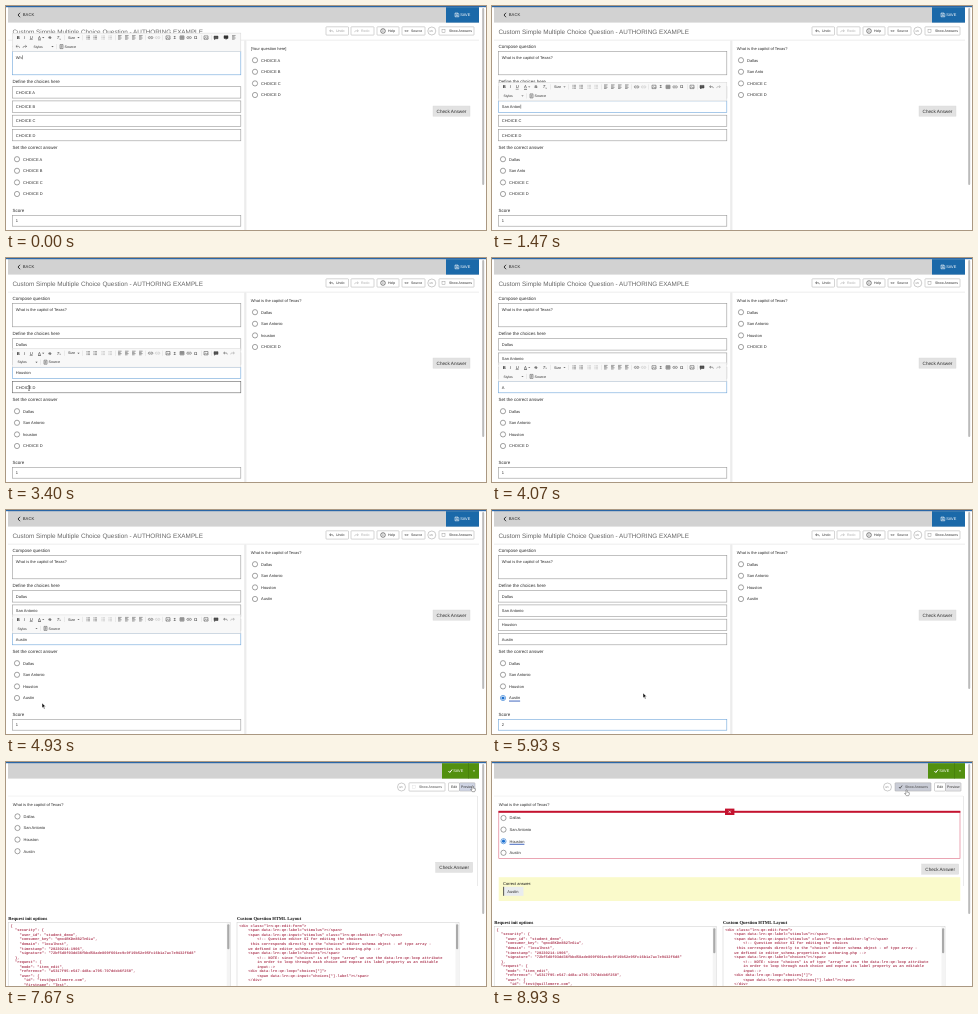
An HTML page that plays this animation: 480 by 224 pixels, repeating every 9.39 s.

```html
<!DOCTYPE html>
<html lang="en">
<head>
<meta charset="utf-8">
<title>Question authoring</title>
<style>
  html, body { margin: 0; width: 100%; height: 100%; overflow: hidden; background: #fff; }
  svg { display: block; width: 480px; height: 224px; }
  text { font-family: "Liberation Sans", Arial, sans-serif; white-space: pre; text-rendering: geometricPrecision; }
  .code { font-family: "Liberation Mono", monospace; font-weight: bold; }
  .serif { font-family: "Liberation Serif", serif; font-weight: bold; }
  .bold { font-weight: bold; }
  .italic { font-style: italic; }
</style>
</head>
<body>
<svg id="stage" viewBox="0 0 480 224"></svg>
<script>
const LOOP = 9390;
const INK = '#2c2c2c', BLUE = '#1a6fd0', RED = '#c4122f';
const stage = document.getElementById('stage');

// Drawing helpers; text is placed by its vertical centre.
const escape = s => s.replace(/&/g, '&amp;').replace(/</g, '&lt;');
const text = (x, y, s, size = 4, fill = INK, cls = '') =>
  `<text x="${x}" y="${y + size * .35}" font-size="${size}" fill="${fill}" class="${cls}">${escape(s)}</text>`;
const rect = (x, y, w, h, fill = '#fff', stroke = 'none', line = .6, r = 0) =>
  `<rect x="${x}" y="${y}" width="${w}" height="${h}" rx="${r}" fill="${fill}" stroke="${stroke}" stroke-width="${line}"/>`;
const path = (x, y, d, stroke = '#444', line = .5, fill = 'none') =>
  `<path transform="translate(${x} ${y})" d="${d}" stroke="${stroke}" stroke-width="${line}" fill="${fill}"/>`;
const circle = (x, y, r, fill, stroke = 'none') =>
  `<circle cx="${x}" cy="${y}" r="${r}" fill="${fill}" stroke="${stroke}" stroke-width=".6"/>`;
const arrowDown = (x, y, fill = '#555') => path(x, y, 'M-1.1 -.5h2.2l-1.1 1.2z', 'none', 0, fill);

const probe = document.createElement('canvas').getContext('2d');
probe.font = '40px "Liberation Sans", Arial, sans-serif';
const widthOf = s => probe.measureText(s).width / 10;

// Value of the latest [time, value] pair.
const at = (t, pairs) => pairs.reduce((v, [start, next]) => t >= start ? next : v, pairs[0][1]);
const typing = (start, gap, from, word) =>
  [...word].slice(from).map((_, i) => [start + i * gap, word.slice(0, from + i + 1)]);

const QUESTION = 'What is the capitol of Texas?';
const ROWS = [80.7, 94.9, 109.2, 123.4];
const FIELDS = [
  [[0, 'CHOICE A'], [870, 'Dallas']],
  [[0, 'CHOICE B'], [870, 'San Ant'], ...typing(1070, 60, 7, 'San Anton'), ...typing(1530, 70, 9, 'San Antonio')],
  [[0, 'CHOICE C'], [2200, ''], ...typing(2400, 90, 0, 'houston'), [3200, 'ouston'], [3270, 'Houston']],
  [[0, 'CHOICE D'], [3930, ''], ...typing(4070, 52, 0, 'Austin')]
];
const LABELS = [
  [[0, 'CHOICE A'], [870, 'Dallas']],
  [[0, 'CHOICE B'], [1270, 'San Anto'], [1670, 'San Antonio']],
  [[0, 'CHOICE C'], [3000, 'houston'], [3530, 'Houston']],
  [[0, 'CHOICE D'], [4470, 'Austin']]
];
const FOCUS = [[0, 'question'], [870, 1], [1870, 2], [3470, 3], [5130, ''], [5400, 'score']];
const SAVED = 7130, PICKED = 8070, CHECKED = 8400, SHOWN = 8730;

// Pointer stops: time, x, y, shape on the way to the next stop.
const POINTER = [
  [3130, 60, 104, 'arrow'], [3330, 23, 130, 'beam'], [3540, 23, 130, ''],
  [4470, 24, 136, 'arrow'], [4930, 36, 193, 'arrow'], [5070, 12, 187, 'hand'], [5200, 12, 187, 'arrow'],
  [5400, 22, 213, 'beam'], [5730, 22, 213, 'arrow'], [5930, 151, 183, 'arrow'], [6530, 366, 84, 'arrow'],
  [6730, 366, 78, 'arrow'], [7000, 456, 10, 'hand'], [7200, 456, 10, 'hand'], [7470, 466, 24, 'hand'],
  [7700, 466, 24, 'arrow'], [8000, 22, 78, 'hand'], [8130, 22, 78, 'arrow'], [8370, 446, 105, 'hand'],
  [8470, 446, 105, 'arrow'], [8670, 414, 28, 'hand'], [LOOP, 414, 28, 'hand']
];
const SHAPES = {
  arrow: ['M0 0v5l1.2-1.1.9 2 .9-.4-.9-1.9h1.6z', '#fff', .5, '#111'],
  hand: ['M0 0q.7-.6 1.1 .1v1.9l2.2.7v1.6l-.7 1.4h-2.2l-1.8-2.2.4-.5 1 .6z', '#555', .5, '#fff'],
  beam: ['M-.8-2.4h1.6M0-2.4v4.8M-.8 2.4h1.6', '#222', .5]
};

function pointer(t) {
  const i = POINTER.findIndex(p => p[0] > t) - 1;
  if (i < 0 || !POINTER[i][3]) return '';
  const [t0, x0, y0, shape] = POINTER[i], [t1, x1, y1] = POINTER[i + 1];
  const k = (t - t0) / (t1 - t0), ease = k * k * (3 - 2 * k);
  return path(x0 + (x1 - x0) * ease, y0 + (y1 - y0) * ease, ...SHAPES[shape]);
}

const radio = (x, y, label, on) =>
  circle(x, y, 2.6, '#fff', on ? BLUE : '#666') + (on ? circle(x, y, 1.6, BLUE) : '') +
  text(x + 6, y, label) + (on ? rect(x + 6, y + 2.6, widthOf(label), .9, '#2f58b8') : '');

function field(y, h, value, state, cy = y + h / 2) {
  const stroke = { focus: '#6fa6da', hover: '#666' }[state] || '#999';
  return rect(6.5, y, 228.3, h, '#fff', stroke) + text(9.8, cy, value);
}

const caret = (value, y) => rect(10 + widthOf(value), y - 2, .4, 4, '#111');

const LINES = 'M0 0h3.6M0 1.2h2.6M0 2.4h3.6M0 3.6h2.6';
const LIST = 'M0 .4h.6M1.4 .4h2.6M0 1.9h.6M1.4 1.9h2.6M0 3.4h.6M1.4 3.4h2.6';
const LINK = 'M1.8 1h-1a1 1 0 0 0 0 2h1M2.4 1h1a1 1 0 0 1 0 2h-1M1.2 2h1.8';
const FRAME = 'M0 .3h4v3.4h-4zM.4 3.2l1.2-1.4 1 .9 .7-.6 .7 .8';
const TABLE = 'M0 .3h4v3.4h-4zM0 1.4h4M0 2.5h4M2 .3v3.4';
const UNDO = 'M1.5 .6l-1.4 1.2 1.4 1.2M.2 1.8h2.6q1 .1 1 1.4';
const REDO = 'M2.5 .6l1.4 1.2-1.4 1.2M3.8 1.8h-2.6q-1 .1-1 1.4';
const SOURCE = 'M0 0h3v4h-3zM.7 1.2h1.6M.7 2.2h1.6M.7 3.1h1';

function toolbar(bottom, wide) {
  const y = bottom - 14, low = bottom - 5, x2 = wide ? 16 : 0;
  const icon = (x, d, row = y, color) => path(x, row - 2, d, color);
  let out = rect(6.5, bottom - 18.5, 228.3, 18.5, '#f8f8f8', '#d6d6d6', .5);
  out += text(10.7, y, 'B', 4.2, INK, 'bold') + text(17.7, y, 'I', 4.2, INK, 'italic') +
    text(23.7, y, 'U', 4.2) + rect(23.7, y + 2, 3, .4, INK) +
    text(32, y, 'A', 4.2) + rect(32, y + 2, 3, .6, INK) + arrowDown(37.2, y) +
    text(42.4, y, 'S', 4.2) + rect(42, y - .1, 3.6, .4, INK) +
    text(50.8, y, 'T', 4.2, INK, 'italic') + text(53.4, y + 1, 'x', 2.6);
  out += text(62, y, 'Size', 3.6) + arrowDown(72.5, y);
  out += [80, 87].map(x => icon(x, LIST)).join('') + [95, 102].map(x => icon(x, LIST, y, '#aaa')).join('');
  out += [112, 119, 126, 133].map(x => icon(x, LINES)).join('');
  out += icon(142.5, LINK) + icon(149.5, LINK, y, '#bbb') + icon(160, FRAME) + text(167.5, y, 'Σ', 4.4) +
    icon(174, TABLE) + icon(181, LINK) + text(188, y, 'Ω', 4.4) + icon(198, FRAME) +
    path(208, y - 1.5, 'M0 0h4v2.6h-2.4l-1 1v-1h-.6z', '#333', .5, '#555');
  if (wide) out += path(218, y - 1.8, 'M0 0h4v2.6h-1l-1 1v-1h-2z', '#333', .5, '#333') + icon(226, LINES);
  const [ux, uy] = wide ? [9.8, low] : [217.5, y];
  out += icon(ux, UNDO, uy) + icon(ux + 7, REDO, uy, wide ? '#444' : '#999');
  out += [58.5, 76.5, 109, 139.5, 156.5, 195, 205].map(x => rect(x, y - 2.6, .4, 5.2, '#d4d4d4')).join('');
  out += text(11.5 + x2, low, 'Styles', 3.4) + arrowDown(30.5 + x2, low) + rect(34.5 + x2, low - 2.6, .4, 5.2, '#d4d4d4') +
    icon(38 + x2, SOURCE, low) + text(42.5 + x2, low, 'Source', 3.6);
  return out;
}

const button = (x, w, label, color = INK, fill = '#fff', pad = 10) =>
  rect(x, 20.8, w, 8.3, fill, '#aaa', .5, .6) + text(x + pad, 25, label, 3.5, color);
const keyButton = x => circle(x, 25, 4, '#fff', '#aaa') + text(x - 2.6, 24.9, '</>', 2.8, '#555');
const checkAnswer = (x, y) => rect(x, y, 37, 10.2, '#e2e2e2', '#d8d8d8', .4) + text(x + 3.6, y + 5.1, 'Check Answer', 4.65);

const frame = thumb =>
  rect(0, 0, 480, 224) + rect(2, 1, 471, 15.6, '#d2d2d2') + rect(0, 0, 480, 1.2, '#2a66a6') +
  rect(476.2, 2, 2, thumb, '#bbb', 'none', 0, 1);

function editPage(t) {
  const focus = at(t, FOCUS), first = t < 870;
  const labels = LABELS.map(pairs => at(t, pairs));
  const values = FIELDS.map(pairs => at(t, pairs));
  let out = frame(177) + path(12, 6.8, 'M2 0l-2 2.2 2 2.2', '#222', .9) + text(16.8, 9, 'BACK', 4.2) +
    rect(440, 1.2, 33, 15.4, '#1b69a9') + path(449, 7, 'M0 0h3l.8.8v3h-3.8zM.9 0v1.3h1.6v-1.3M.9 3.8v-1.3h2v1.3', '#fff', .5) +
    text(454.2, 9, 'SAVE', 3.9, '#fff');

  out += text(6.5, 25.5, 'Custom Simple Multiple Choice Question - AUTHORING EXAMPLE', 6.35, '#666') +
    rect(2, 33.8, 471, .6, '#e2e2e2') + rect(238.2, 34.4, 2.2, 189.6, '#ececec');
  const undoInk = first ? '#999' : INK;
  out += button(320, 22.5, 'Undo', undoInk) + path(323.5, 23, UNDO, undoInk) +
    button(345, 23, 'Redo', '#aaa') + path(348.5, 23, REDO, '#aaa') +
    button(371, 22, 'Help', INK, '#fff', 11) + circle(377, 25, 2.3, '#fff', INK) + text(376.5, 25, 'i', 3.4, INK, 'bold') +
    button(396, 23, 'Source', INK, '#fff', 9) + text(398.5, 25, '<>', 3.4, INK, 'bold') + keyButton(425.8) +
    button(433, 35, 'Show Answers') + rect(436, 23.4, 3, 3, '#fff', '#888', .4);

  out += text(6.5, 40, 'Compose question', 4.5) + text(6.5, 75, 'Define the choices here', 4.5) +
    text(6.5, 141, 'Set the correct answer', 4.5) + text(6.5, 204, 'Score', 4.5);
  const question = first ? 'Wh' : QUESTION;
  out += field(45.6, 23.2, question, first && 'focus', 51.3);
  ROWS.forEach((y, i) => {
    const hover = i === 3 && t >= 3330 && t < 3470;
    const selected = (i === 2 && t >= 2130 && t < 2200) || (i === 3 && t >= 3800 && t < 3930);
    if (selected) out += field(y, 11.4, '', 'focus') + rect(9.7, y + 3.2, 20, 5, '#b4d5fe') + text(9.8, y + 5.7, values[i]);
    else out += field(y, 11.4, values[i], focus === i ? 'focus' : hover && 'hover');
  });
  out += field(209.5, 10.7, t < 5530 ? '1' : '2', focus === 'score' && 'focus');
  labels.forEach((label, i) => {
    out += radio(11, 153.2 + i * 11.6, label, i === 3 && t >= 5130) + radio(249, 54.2 + i * 11.6, label);
  });
  out += text(244.7, 42.2, first ? '[Your question here]' : QUESTION) + checkAnswer(427, 100);

  const blink = (t + 550) % 1000 < 450;
  if (first) out += toolbar(45.6, true) + caret(question, 51.3);
  else if (focus > 0) out += toolbar(ROWS[focus]) + (blink ? caret(values[focus], ROWS[focus] + 5.7) : '');
  return out;
}

const REQUEST = `{
  "security": {
    "user_id": "student_demo",
    "consumer_key": "qmx4RKDe8B2Tn6Lw",
    "domain": "localhost",
    "timestamp": "20230214-1906",
    "signature": "72bf5d8f03dd36fbbd58ade809f601ec9c9f19b52e95fc16b1a7ac7e9432f6d8"
  },
  "request": {
    "mode": "item_edit",
    "reference": "a5317f95-e547-4d8a-a795-707ddcb6f250",
    "user": {
      "id": "test@quillomere.com",
      "firstname": "Test",`.split('\n');
const LAYOUT = `<div class="lrn-qe-edit-form">
    <span data-lrn-qe-label="stimulus"></span>
    <span data-lrn-qe-input="stimulus" class="lrn-qe-ckeditor-lg"></span>
        <!-- Question editor UI for editing the choices
     this corresponds directly to the "choices" editor schema object - of type array -
    we defined in editor_schema.properties in authoring.php -->
    <span data-lrn-qe-label="choices"></span>
        <!-- NOTE: since "choices" is of type "array" we use the data-lrn-qe-loop attribute
        in order to loop through each choice and expose its label property as an editable
        input-->
    <div data-lrn-qe-loop="choices[*]">
        <span data-lrn-qe-input="choices[*].label"></span>
    </div>`.split('\n');

const codeBox = (x, y, title, lines) =>
  text(x, y, title, 4.6, '#111', 'serif') + rect(x, y + 4.5, 222, 80, '#fff', '#ccc', .5) +
  rect(x + 218.5, y + 4.8, 3.3, 80, '#f4f4f4') + rect(x + 219, y + 6, 2.2, 25, '#aaa', 'none', 0, 1) +
  lines.map((line, i) => text(x + 2.3, y + 7.4 + i * 4.53, line, 3.73, '#b0405a', 'code')).join('');

function previewPage(t) {
  const checked = t >= CHECKED, shown = t >= SHOWN;
  let out = frame(150) + rect(436, 1.2, 37, 15.4, '#52900f') + rect(462.3, 1.2, .5, 15.4, '#3f7209') +
    path(442.5, 7.4, 'M0 1.6l1.3 1.5 2.3-3', '#fff', 1) + text(447.2, 9, 'SAVE', 3.9, '#fff') + arrowDown(468, 9, '#fff');
  out += keyButton(395.5) + button(403, 36, 'Show Answers', '#444', shown ? '#c9ccd6' : '#fff') +
    (shown ? path(407, 23.4, 'M0 1.6l1.1 1.3 2-2.8', '#333', .7) : rect(406.5, 23.4, 3, 3, '#fff', '#ddd', .4)) +
    button(442.5, 11, 'Edit', INK, '#fff', 2.4) +
    button(453.5, 15.5, 'Preview', INK, t < 7800 ? '#cfd4e4' : '#e4e4e8', 1.6);
  out += rect(2, 33.8, 469, .5, '#e6e6e6') + rect(471, 34, .6, 90, '#ddd') + text(6.7, 42.3, QUESTION);

  const shift = checked ? 1.6 : 0;
  if (checked) out += rect(6.8, 49.5, 461.2, 47, '#fff', '#dc6a80', .6) + rect(6.5, 48.8, 461.8, 2, RED) +
    rect(233, 46.6, 9.4, 6.4, RED) + path(236.6, 48.7, 'M0 0l2.2 2.2M2.2 0l-2.2 2.2', '#fff', .7);
  ['Dallas', 'San Antonio', 'Houston', 'Austin'].forEach((label, i) => {
    out += radio(11.5, 54.4 + shift + i * 11.6, label, i === 2 && t >= PICKED);
  });
  out += checkAnswer(429.7, checked ? 102 : 100.2);
  if (shown) out += rect(6.7, 115.2, 461.6, 23.8, '#fafacb') + text(11, 121.2, 'Correct answer:', 4, '#111') +
    rect(12, 124.8, 19.5, 9, '#e9ecee') + rect(11.2, 124.8, .9, 9, '#444') + text(15.3, 129.5, 'Austin');

  const y = checked ? 160.2 : 156.2;
  return out + codeBox(2.2, y, 'Request init options', REQUEST) + codeBox(231, y, 'Custom Question HTML Layout', LAYOUT);
}

let shownMarkup = '';
function draw() {
  const t = performance.now() % LOOP;
  const markup = (t < SAVED ? editPage(t) : previewPage(t)) + pointer(t);
  if (markup !== shownMarkup) stage.innerHTML = shownMarkup = markup;
  requestAnimationFrame(draw);
}
draw();
</script>
</body>
</html>
```
